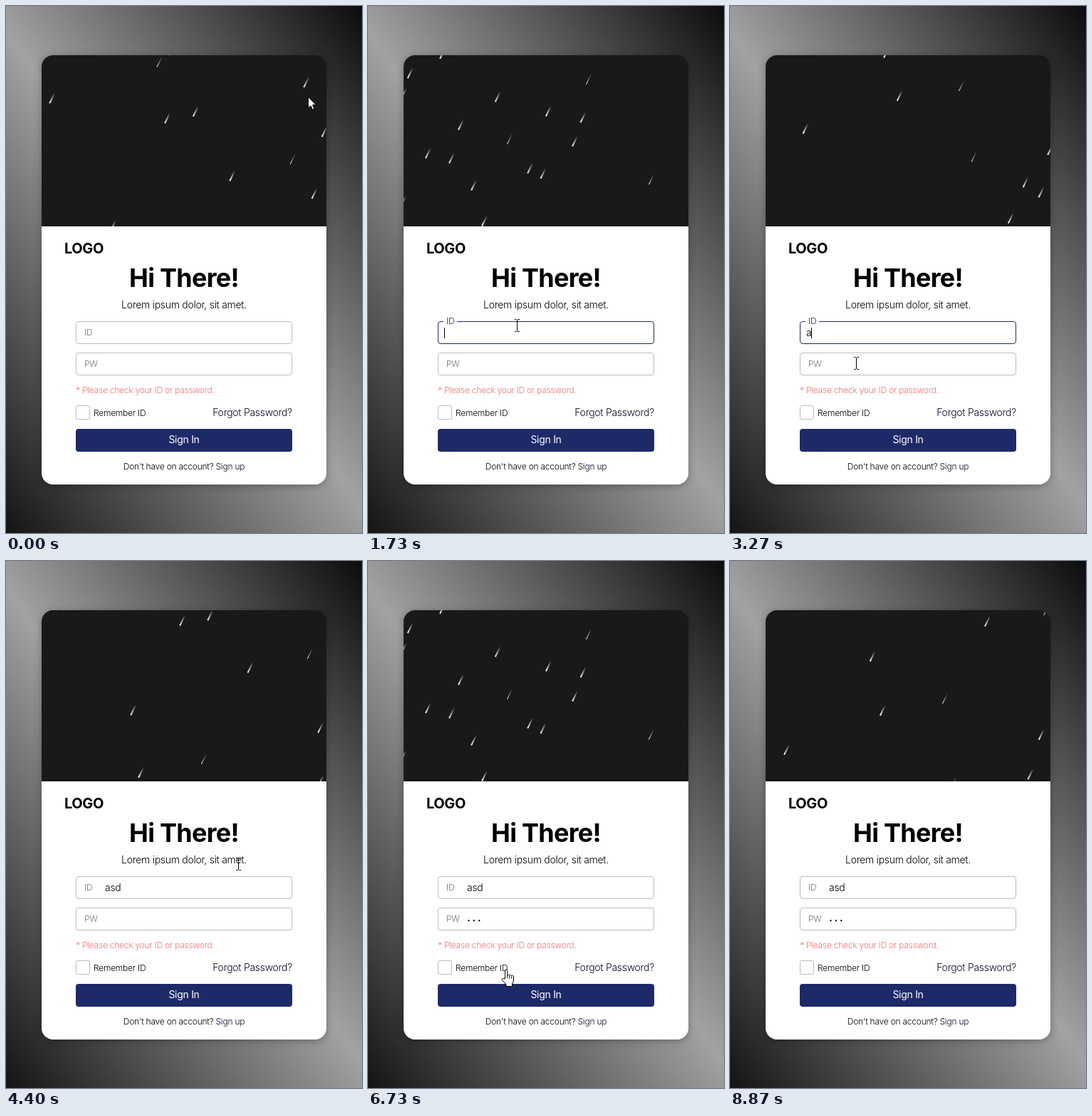
These frames come from a looping animation (500 px wide and 739 px high, 8.94 s). An HTML page:

```html
<!DOCTYPE html>
<html lang="en">
<head>
<meta charset="utf-8">
<title>Sign in</title>
<style>
  html, body { margin: 0; width: 100%; height: 100%; overflow: hidden; }
  body { background: linear-gradient(53deg, #141414, #a2a2a2, #0c0c0c); }
  .card {
    position: absolute; left: 50px; top: 69px; width: 400px; height: 602px;
    border-radius: 16px; background: linear-gradient(#191919 240px, #fff 0);
    box-shadow: 0 2px 12px rgba(0, 0, 0, .3);
  }
  svg { position: absolute; left: 0; top: 0; }
  text { font: 300 12px Inter, sans-serif; letter-spacing: -.02em; fill: #000; white-space: pre; }
  .logo { font-size: 20px; font-weight: 700; }
  .title { font-size: 36px; font-weight: 700; }
  .mid { text-anchor: middle; }
  .end { text-anchor: end; }
  .s14 { font-size: 14px; }
  .dots { font-size: 9px; letter-spacing: 2.3px; }
  .link { fill: #0b0b2b; }
  .box { fill: #fff; stroke: #bcbcbc; }
  .cursor { fill: #fff; stroke: #000; stroke-linejoin: round; }
</style>
</head>
<body>
<div class="card"></div>
<svg width="500" height="739" viewBox="0 0 500 739">
  <defs>
    <linearGradient id="streak" x1="0" y1="0" x2="0" y2="1">
      <stop offset="0" stop-color="#fff" stop-opacity="0"/>
      <stop offset="1" stop-color="#fff"/>
    </linearGradient>
    <clipPath id="sky"><path d="M50 309V85a16 16 0 0 1 16-16H434a16 16 0 0 1 16 16V309Z"/></clipPath>
  </defs>
  <g clip-path="url(#sky)"><g id="rain" fill="url(#streak)"></g></g>

  <text class="logo" x="82" y="347">LOGO</text>
  <text class="title mid" x="250" y="394">Hi There!</text>
  <text class="mid s14" x="250" y="424">Lorem ipsum dolor, sit amet.</text>
  <g id="fields"></g>
  <text x="98" y="543" style="fill:#ff7070">* Please check your ID or password.</text>

  <rect id="check" class="box" x="98.5" y="560.5" width="19" height="19" rx="2"/>
  <path id="tick" d="M102 570.5l4.5 4.5 8-9" fill="none" stroke="#1e2a68" stroke-width="2"/>
  <text x="123" y="575">Remember ID</text>
  <text class="link s14 end" x="402" y="575">Forgot Password?</text>
  <rect x="98" y="593" width="304" height="32" rx="4" fill="#1e2a68"/>
  <text class="mid s14" x="250" y="613" style="fill:#fff;font-weight:400">Sign In</text>
  <text class="mid" x="250" y="650">Don't have on account? <tspan class="link">Sign up</tspan></text>

  <g class="cursor">
    <path id="arrow" d="M.5.5V16L4 12.8 6.4 18.3 9 17.2 6.6 11.8H11.4Z"/>
    <path id="beam" d="M-3.5 -8.5H-1L0 -7.5 1 -8.5H3.5M0 -7.5V7.5M-3.5 8.5H-1L0 7.5 1 8.5H3.5" fill="none"/>
    <path id="hand" d="M-1.5 13V1.5a1.6 1.6 0 0 1 3.2 0V8a1.6 1.6 0 0 1 3 .3 1.6 1.6 0 0 1 3 .7 1.5 1.5 0 0 1 2.8 1v6L8.5 20v3.5H0V21L-5.5 14.5c-1-1.6 1-3 2.3-1.8ZM1.7 8v4M4.7 8.5v4M7.7 9.5v3"/>
  </g>
</svg>
<script>
const LOOP = 8940, FRAME = 1000 / 15;
const NAVY = [30, 42, 104], GREY = [117, 117, 117], LINE = [188, 188, 188];
const $ = id => document.getElementById(id);

function set(node, attrs) {
  for (const key in attrs) node.setAttribute(key, attrs[key]);
}
function make(parent, tag, attrs, text = '') {
  const node = document.createElementNS('http://www.w3.org/2000/svg', tag);
  set(node, attrs);
  node.textContent = text;
  return parent.appendChild(node);
}
const show = (node, on) => node.style.display = on ? '' : 'none';
const mix = (a, b, p) => a + (b - a) * p;
const mixColor = (a, b, p) => `rgb(${a.map((v, i) => Math.round(mix(v, b[i], p)))})`;
const clamp = v => Math.min(1, Math.max(0, v));
const smooth = p => p * p * (3 - 2 * p);

let seed = 11;
function random() {
  seed = (seed * 16807) % 2147483647;
  return seed / 2147483647;
}

// Rain: drops repeat every FALL ms, bunched towards the start of the shower
const FALL = 5000, SHOWER = 4100, DROPS = 41;
const drops = Array.from({ length: DROPS }, (_, i) => {
  const width = i % 6 === 2 ? 1 : 2;
  return {
    x: mix(80, 530, random()),
    delay: SHOWER + FALL * ((i + random()) / DROPS) ** 1.5,
    node: make($('rain'), 'rect', { x: -width / 2, y: -8, width, height: 16 })
  };
});

// cubic-bezier(.42, 0, 1, 1)
function easeIn(x) {
  let lo = 0, hi = 1;
  for (let i = 0; i < 16; i++) {
    const s = (lo + hi) / 2;
    if (1.26 * s + .48 * s * s - .74 * s ** 3 < x) lo = s; else hi = s;
  }
  return smooth(lo);
}

function drawRain(t) {
  for (const { x, delay, node } of drops) {
    const y = 739 * easeIn((t - delay + 2 * FALL) % FALL / FALL);
    set(node, { transform: `translate(${x - .285 * y} ${y}) rotate(26)` });
  }
}

// Input fields with floating labels
function makeField({ label, top, labelWidth, textClass, ...timing }) {
  const g = $('fields');
  return {
    top, ...timing,
    box: make(g, 'rect', { class: 'box', x: 98.5, y: top + .5, width: 303, height: 31, rx: 3.5 }),
    patch: make(g, 'rect', { x: 106, width: labelWidth, height: 14, fill: '#fff' }),
    label: make(g, 'text', { x: 110 }, label),
    text: make(g, 'text', { class: textClass, y: top + 21 }),
    caret: make(g, 'rect', { y: top + 9, width: 1, height: 15 })
  };
}
const fields = [
  { label: 'ID', top: 442, labelWidth: 19, textClass: 's14', value: 'asd', focus: 1330, blur: 4130, typing: 3200 },
  { label: 'PW', top: 486, labelWidth: 26, textClass: 'dots', value: '•••', focus: 4730, blur: 6400, typing: 5270 }
].map(makeField);
const KEY_GAP = 130;

function drawField(f, t) {
  const p = smooth(clamp((t - f.focus) / 200)) - smooth(clamp((t - f.blur) / 200));
  const base = f.top + mix(20, 4, p);
  const left = mix(139, 107, p);
  const typed = Math.min(f.value.length, Math.max(0, Math.floor((t - f.typing) / KEY_GAP) + 1));
  const lastInput = typed ? f.typing + (typed - 1) * KEY_GAP : f.focus;
  f.box.style.stroke = mixColor(LINE, NAVY, p);
  f.label.style.fill = mixColor(GREY, NAVY, p);
  set(f.label, { y: base });
  set(f.patch, { y: base - 10 });
  f.text.textContent = f.value.slice(0, typed);
  set(f.text, { x: left });
  set(f.caret, { x: Math.round(left + (typed ? f.text.getComputedTextLength() : 0)) });
  show(f.caret, t >= f.focus && t < f.blur && (t - lastInput) % 1000 < 500);
}

// Pointer stops: [time, x, y]
const stops = [
  [0, 424, 127], [930, 232, 441], [1300, 209, 448], [1930, 209, 448], [2450, 185, 533],
  [2900, 177, 501], [3650, 177, 501], [4400, 326, 425], [4700, 250, 509], [6000, 270, 549],
  [6450, 235, 577], [6950, 166, 571], [8000, 166, 571], [8560, 200, 745], [LOOP, 200, 760]
];
const inside = (x, y, l, t, r, b) => x >= l && x <= r && y >= t && y <= b;

function pointerKind(x, y) {
  const over = (...area) => inside(x, y, ...area);
  if (over(98, 560, 196, 580) || over(290, 560, 402, 580) || over(98, 593, 402, 625)) return 'hand';
  if (over(98, 442, 402, 518) || over(173, 361, 327, 403) || over(162, 410, 338, 430)
    || over(98, 531, 292, 547)) return 'beam';
  return 'arrow';
}

function drawPointer(t) {
  const i = stops.findIndex(stop => stop[0] > t);
  const [t0, x0, y0] = stops[i - 1], [t1, x1, y1] = stops[i];
  const p = smooth((t - t0) / (t1 - t0));
  const x = Math.round(mix(x0, x1, p)), y = Math.round(mix(y0, y1, p));
  const kind = pointerKind(x, y);
  for (const id of ['arrow', 'beam', 'hand']) {
    show($(id), id === kind);
    set($(id), { transform: `translate(${x + (id === 'beam' ? .5 : 0)} ${y})` });
  }
}

// The picture advances in steps of 1/15 s
function draw(now) {
  const t = Math.floor((now % LOOP + 3.4) / FRAME) * FRAME;
  const checked = t >= 7000 && t < 8000;
  drawRain(t);
  fields.forEach(f => drawField(f, t));
  show($('tick'), checked);
  $('check').style.stroke = checked ? '#1e2a68' : '#bcbcbc';
  drawPointer(t);
}

let start;
function tick(now) {
  start ??= now;
  draw(now - start);
  requestAnimationFrame(tick);
}
draw(0);
requestAnimationFrame(tick);
</script>
</body>
</html>
```
